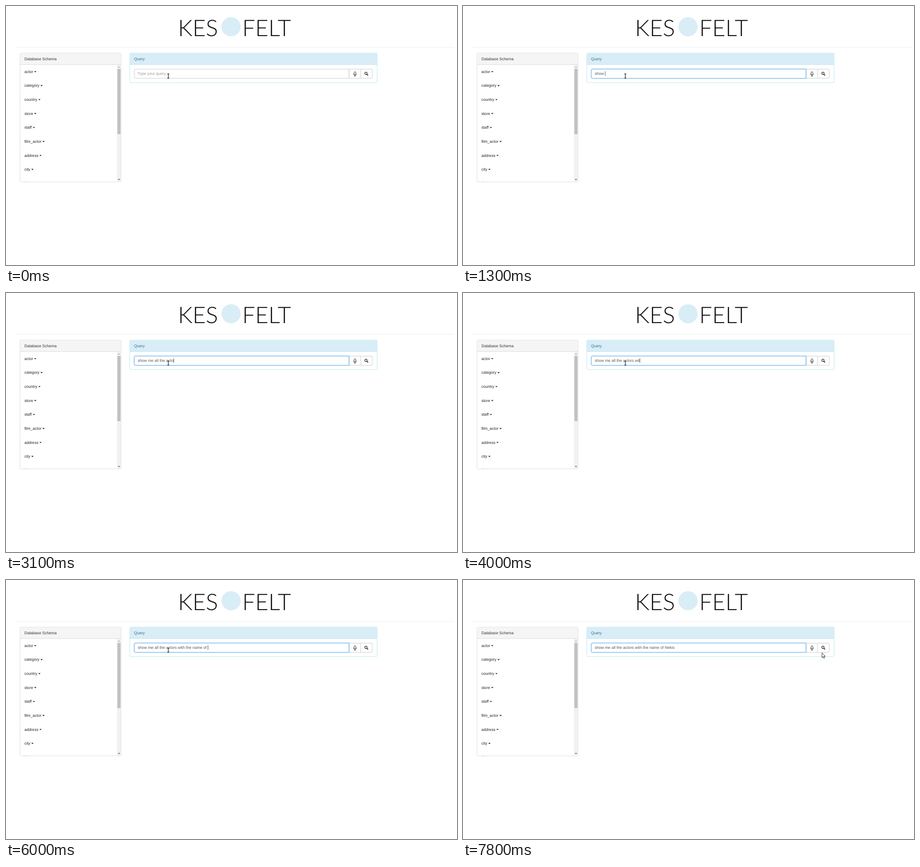
These frames come from a looping animation (986x568 px, 8000 ms). An HTML page:

```html
<!DOCTYPE html>
<html lang="en">
<head>
<meta charset="utf-8">
<title>Query demo</title>
<style>
  html, body { margin: 0; width: 100%; height: 100%; overflow: hidden; background: #fff; }
  svg { display: block; }
  text { font: 8.58px "Liberation Sans", Arial, sans-serif; white-space: pre; text-rendering: geometricPrecision; }
  .word { font: 300 50px Lato, sans-serif; fill: #111; }
  .box { fill: #fff; stroke: #ccc; }
  .focus { stroke: #66afe9; filter: drop-shadow(0 0 1.3px rgba(102, 175, 233, .7)); }
  .icon { fill: none; stroke: #222; }
</style>
</head>
<body>
<svg width="986" height="568" viewBox="0 0 986 568">
  <defs><clipPath id="listArea"><rect x="31" y="129" width="211" height="257"/></clipPath></defs>

  <!-- header -->
  <text class="word" x="376" y="66">KES</text>
  <circle cx="492" cy="45.5" r="21" fill="#d9edf7"/>
  <text class="word" x="623" y="66" text-anchor="end">FELT</text>
  <path d="M21 90.5H980" stroke="#eee"/>

  <!-- schema panel -->
  <rect x="30.7" y="103.2" width="221" height="282.6" rx="2.5" fill="#fff" stroke="#ddd"/>
  <path d="M31.2 128.5V105.7q0-2 2-2H249.2q2 0 2 2V128.5Z" fill="#f5f5f5"/>
  <path d="M31 128.5H251.5" stroke="#ddd"/>
  <text x="40.2" y="118.8" fill="#333">Database Schema</text>
  <g id="list" clip-path="url(#listArea)" fill="#222"></g>
  <rect x="242.5" y="129" width="8.8" height="256.4" fill="#f1f1f1"/>
  <rect x="243.5" y="138" width="6.9" height="143" fill="#c1c1c1"/>
  <path d="M244.7 134.9h4.6l-2.3-2.5z" fill="#a3a3a3"/>
  <path d="M244.7 379.4h4.6l-2.3 2.5z" fill="#505050"/>

  <!-- query panel -->
  <rect x="270.6" y="103.2" width="540.8" height="64.7" rx="2.5" fill="#fff" stroke="#bce8f1"/>
  <path d="M271.1 128.5V105.7q0-2 2-2H808.9q2 0 2 2V128.5Z" fill="#d9edf7"/>
  <path d="M271 128.5H811" stroke="#bce8f1"/>
  <text x="280" y="118.8" fill="#31708f">Query</text>
  <path id="field" class="box" d="M750 138.4H283q-2.5 0-2.5 2.5V156q0 2.5 2.5 2.5H750Z"/>
  <path class="box" d="M750.5 138.4H775.5V158.5H750.5"/>
  <path class="box" d="M775.5 138.4H798.3q2.5 0 2.5 2.5V156q0 2.5-2.5 2.5H775.5Z"/>
  <path id="edge" d="M750 138.4V158.5" stroke="#ccc"/>
  <g class="icon">
    <rect x="761.1" y="144.2" width="3.6" height="6.4" rx="1.8" stroke-width=".9"/>
    <path d="M759.7 148.3v.7a3.2 3.2 0 0 0 6.4 0v-.7M762.9 152.2v1.7M760.8 154h4.2" stroke-width=".8"/>
    <circle cx="787" cy="147.7" r="2.5" stroke-width="1.2"/>
    <path d="M788.9 149.6l2.7 2.8" stroke-width="1.7"/>
  </g>

  <text id="query" x="288" y="151.2"></text>
  <path id="caret" d="M.5 143.3V153" stroke="#222" stroke-width=".8"/>

  <!-- pointers -->
  <g id="beam" fill="none">
    <path d="M352.6 148.8h1.4l.8.6.8-.6h1.4M354.8 149v9M352.6 158.3h1.4l.8-.6.8.6h1.4" stroke="#fff" stroke-width="2.4"/>
    <path d="M352.6 148.8h1.4l.8.6.8-.6h1.4M354.8 149v9M352.6 158.3h1.4l.8-.6.8.6h1.4" stroke="#111" stroke-width="1.2"/>
  </g>
  <path id="arrow" d="M0 0V10.3L2.4 8.2 4 11.8 5.7 11.1 4.1 7.5H7.1Z" fill="#fff" stroke="#111" stroke-width=".9"/>
</svg>

<script>
const LOOP = 8000, TEXT_X = 288;
const SENTENCE = "show me all the actors with the name of Nekis";
// [time in ms, letters typed by then]
const TYPING = [
  [0, 0], [700, 1], [900, 2], [1000, 3], [1100, 4],
  [1300, 5], [1400, 6], [1500, 7], [1600, 8], [1700, 9], [1800, 10], [2000, 11],
  [2200, 12], [2300, 13], [2400, 14], [2500, 15], [3100, 20], [3300, 21],
  [3700, 24], [4000, 26], [4300, 28], [4600, 30], [5100, 33], [5400, 36],
  [5700, 37], [6000, 40], [6800, 43], [7100, 45]
];
const $ = id => document.getElementById(id);
const [list, field, edge, query, caret, beam, arrow] =
  ["list", "field", "edge", "query", "caret", "beam", "arrow"].map($);

function add(tag, attrs) {
  const node = document.createElementNS("http://www.w3.org/2000/svg", tag);
  for (const key in attrs) node.setAttribute(key, attrs[key]);
  return list.appendChild(node);
}

["actor", "category", "country", "store", "staff", "film_actor", "address", "city", "film"].forEach((name, i) => {
  const y = 146.8 + i * 30.63;
  const label = add("text", { x: 40.2, y });
  label.textContent = name;
  const x = 40.2 + label.getComputedTextLength() + 2.2;
  add("path", { d: `M${x} ${y - 3.9}h5l-2.5 2.6z` });
});

const show = (node, on) => node.setAttribute("visibility", on ? "visible" : "hidden");

function draw(t) {
  const typed = TYPING.findLast(([start]) => start <= t)[1];
  query.textContent = typed ? SENTENCE.slice(0, typed) : "Type your query.";
  query.setAttribute("fill", typed ? "#555" : "#999");

  const focused = t >= 400;
  field.classList.toggle("focus", focused);
  field.style.stroke = t >= 200 && !focused ? "#a5c2d8" : "";
  edge.setAttribute("stroke", focused ? "#66afe9" : t >= 200 ? "#a5c2d8" : "#ccc");

  show(caret, t >= 200 && t < 7800);
  const width = typed ? query.getComputedTextLength() : 0;
  caret.setAttribute("transform", `translate(${TEXT_X + width})`);

  show(beam, t < 7400);
  show(arrow, t >= 7400);
  arrow.setAttribute("transform", t < 7800 ? "translate(708.9 184.8)" : "translate(784.9 159.8)");
}

function frame(now) {
  draw(now % LOOP);
  requestAnimationFrame(frame);
}
draw(0);
requestAnimationFrame(frame);
</script>
</body>
</html>
```
